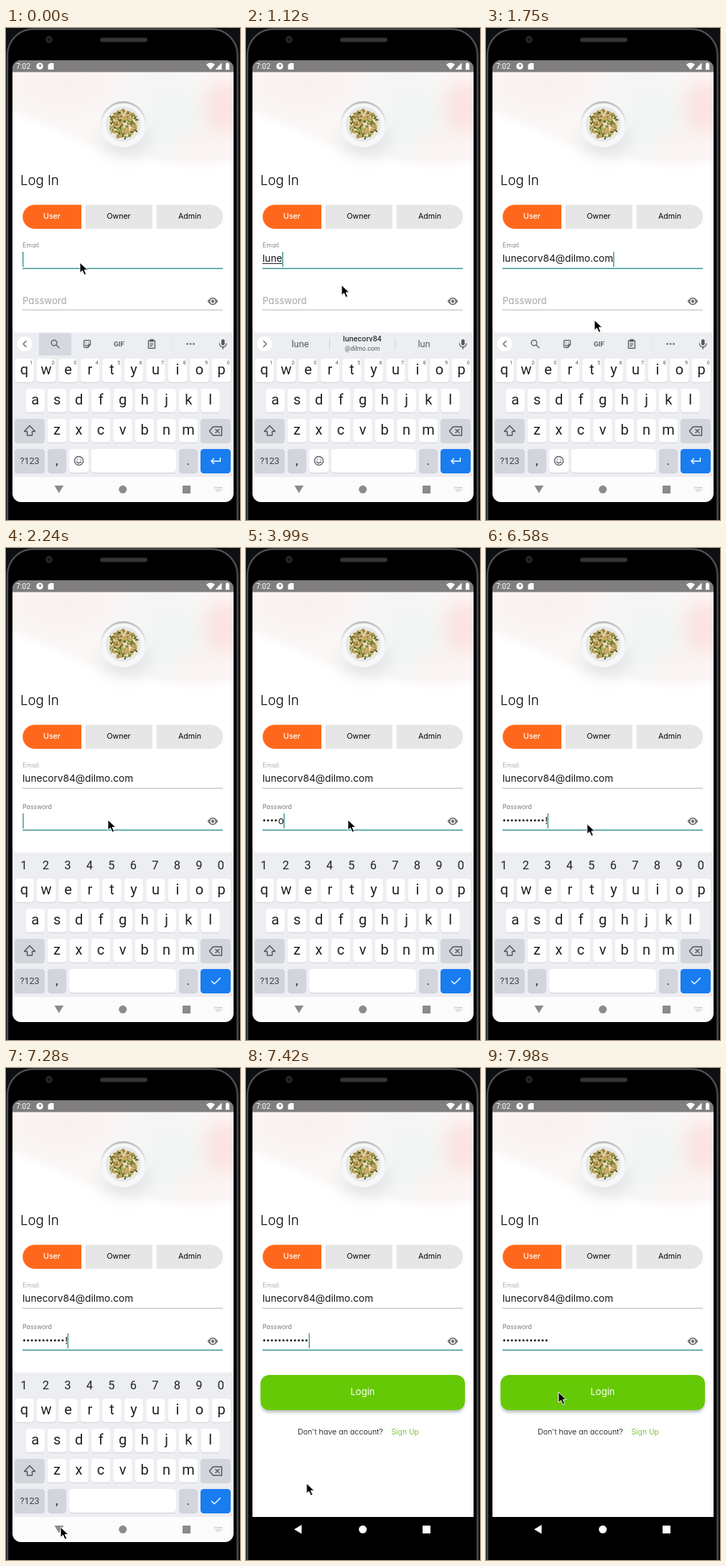
An HTML page for the animation above (8 s loop, 326x686 px).

```html
<!DOCTYPE html>
<html lang="en">
<head>
<meta charset="utf-8">
<title>Log in screen</title>
<style>
html, body { margin: 0; width: 100%; height: 100%; overflow: hidden; background: #000; }
svg { display: block; width: 326px; height: 686px; }
text { font-family: Inter, "Open Sans", sans-serif; font-feature-settings: "cv11"; white-space: pre; }
.sys text, text.sys { font-family: Roboto, "Noto Sans", sans-serif; }
.mid { text-anchor: middle; }
.light { font-weight: 300; }
.soft { filter: blur(12px); }
.line { fill: none; stroke: #5f6368; stroke-width: 1.4; stroke-linecap: round; stroke-linejoin: round; }
.field { font-size: 13.7px; fill: #161616; }

#cursor { animation: cursor 8s linear infinite; }
@keyframes cursor {
  0%, 13.9% { transform: translate(103px, 327px); }
  14% { transform: translate(133px, 358px); }
  16.6% { transform: translate(158px, 432px); }
  17.5%, 20% { transform: translate(161px, 438px); }
  23.6%, 82.1% { transform: translate(142px, 379px); }
  86% { transform: translate(112px, 510px); }
  90%, 91.3% { transform: translate(76px, 640px); }
  91.9% { transform: translate(80px, 607px); }
  95.5% { transform: translate(98px, 490px); }
  98.5%, 100% { transform: translate(101px, 452px); }
}
#hint { animation: hint 8s linear infinite; }
@keyframes hint {
  0%, 24.4% { transform: translate(23px, 385px); fill: #a6a6a6; }
  26.4%, 100% { transform: translate(23px, 364.3px) scale(.665); fill: #777; }
}
</style>
</head>
<body>
<svg viewBox="0 0 326 686">
  <defs>
    <clipPath id="screen"><rect x="9" y="45" width="308" height="616" rx="12"/></clipPath>
    <clipPath id="app"><rect x="9" y="61" width="308" height="565"/></clipPath>
    <clipPath id="food"><circle cx="163.500" cy="134" r="22.500"/></clipPath>
    <linearGradient id="plate" x2="0" y2="1">
      <stop stop-color="#b9bcbf"/><stop offset=".35" stop-color="#e3e5e7"/><stop offset=".75" stop-color="#fafafa"/>
    </linearGradient>
  </defs>

  <!-- phone body -->
  <rect width="326" height="686" fill="#0d0f12"/>
  <rect x="2" y="1.500" width="320.500" height="720" rx="36" fill="#000" stroke="#4c4d4f" stroke-width="2.400"/>
  <rect x="131" y="13.500" width="66" height="6" rx="3" fill="#343434"/>
  <circle cx="60" cy="16" r="5" fill="#25262a"/>
  <circle cx="60" cy="16" r="2.200" fill="#11131a"/>

  <g clip-path="url(#screen)">
    <rect x="9" y="45" width="308" height="581" fill="#fff"/>

    <!-- header -->
    <g clip-path="url(#app)">
      <path d="M0 50H330V186L240 190 130 170 60 138 0 114z" fill="#fbf7f6" style="filter:blur(4px)"/>
      <g class="soft">
        <ellipse cx="80" cy="80" rx="70" ry="28" fill="#f9f1ef"/>
        <ellipse cx="215" cy="84" rx="62" ry="28" fill="#f5f5f5"/>
        <ellipse cx="236" cy="136" rx="48" ry="38" fill="#f0f6f4"/>
        <ellipse cx="308" cy="110" rx="34" ry="36" fill="#fbe3e0"/>
        <ellipse cx="276" cy="160" rx="40" ry="22" fill="#faf3f1"/>
        <ellipse cx="168" cy="156" rx="32" ry="22" fill="#e0e2e6"/>
      </g>
      <circle cx="163.500" cy="134" r="32" fill="url(#plate)"/>
      <circle cx="163.500" cy="135" r="30" fill="#f6f7f7"/>
      <circle cx="163.500" cy="134" r="24.500" fill="#e6e7e7"/>
      <g id="pasta" clip-path="url(#food)"></g>
    </g>

    <!-- form -->
    <text x="20" y="219" font-size="18.600" font-weight="350">Log In</text>
    <path d="M105 246.500H40a16.700 16.700 0 0 0 0 33.500h65z" fill="#ff681c"/>
    <path d="M110.500 246.500H204V280h-93.500zM209.500 246.500h76a16.700 16.700 0 0 1 0 33.500h-76z" fill="#e6e6e6"/>
    <g class="mid" font-size="10.600">
      <text x="64" y="266.300" fill="#fff" font-weight="500">User</text>
      <text x="157" y="266.300">Owner</text>
      <text x="256" y="266.300">Admin</text>
    </g>
    <text id="emailLabel" class="light" x="23" y="306.200" font-size="9">Email</text>
    <text id="email" class="field" x="23" y="326"></text>
    <rect id="compose" x="23" y="328" height="1" fill="#222"/>
    <rect id="emailLine" x="23" width="279"/>
    <text id="hint" font-size="13.200">Password</text>
    <g id="dots" fill="#161616"></g>
    <text id="last" class="field" y="384.500"></text>
    <rect id="passLine" x="23" width="279"/>
    <rect id="caret" width="1.300" height="21" fill="#2c8a87"/>
    <path d="M280.500 381q7.500-10.500 15 0q-7.500 10.500-15 0z" fill="#757575"/>
    <circle cx="288" cy="381" r="2.900" fill="#757575" stroke="#fff" stroke-width="1.300"/>

    <rect x="21" y="432" width="283" height="48" rx="11" fill="#777" opacity=".5" style="filter:blur(2px)"/>
    <rect x="20.300" y="428" width="284.700" height="49" rx="12" fill="#65c905"/>
    <text class="mid" x="162.500" y="455.500" font-size="13" fill="#fff">Login</text>
    <text class="light" x="72" y="511" font-size="10.700">Don't have an account?</text>
    <text x="202.500" y="511" font-size="10.300" fill="#86bf3c">Sign Up</text>

    <!-- keyboard -->
    <g id="keyboard" class="sys">
      <rect x="9" y="424.500" width="308" height="202" fill="#eceef2"/>
      <g id="keys"></g>
      <g id="textMode"></g>
      <g id="passMode"></g>
      <g id="tools">
        <rect id="pressed" x="46" y="425.500" width="45" height="31" fill="#d5d8de"/>
        <circle cx="26" cy="440.500" r="10.500" fill="#fff"/>
        <path class="line" d="M28 436.500l-4 4 4 4"/>
        <circle class="line" cx="67" cy="439" r="3.800"/>
        <path class="line" d="M70 442l4 4"/>
        <path class="line" d="M117.500 441.500v-4.500q0-1.500-1.500-1.500h-6q-1.500 0-1.500 1.500v7q0 1.500 1.500 1.500h4zh-3v4M111.200 439h.1M114.800 439h.1M110.500 442q1 1.500 2.500 1"/>
        <text class="mid" x="157.500" y="444" font-size="9.800" font-weight="700" fill="#5f6368">GIF</text>
        <path class="line" d="M198.500 436h9v10.500h-9zM201 434.500h4v2.500h-4zM200.800 440.500h4.400M200.800 443.300h3"/>
        <rect x="230" y="432" width="1" height="16" fill="#dcdfe3"/>
        <path class="line" d="M252.500 440.500h.1M257 440.500h.1M261.500 440.500h.1" style="stroke-width:2.600"/>
      </g>
      <g id="suggest" class="mid" fill="#55595e">
        <circle cx="26" cy="440.500" r="10.500" fill="#fff"/>
        <path class="line" d="M24.500 436.500l4 4-4 4"/>
        <path d="M116 432h1v17h-1zM207.500 432h1v17h-1z" fill="#cfd2d7"/>
        <text id="sugLeft" x="75.500" y="445" font-size="12.800"></text>
        <text id="sugUser" x="162" y="437" font-size="10.800" font-weight="500" fill="#33373b"></text>
        <text id="sugHost" x="162" y="449.500" font-size="8.600"></text>
        <text id="sugRight" x="248" y="445" font-size="12.800"></text>
      </g>
      <g id="mic">
        <rect x="300" y="434" width="4.600" height="8.500" rx="2.300" fill="#55595e"/>
        <path class="line" d="M297.500 440a4.800 4.800 0 0 0 9.600 0M302.300 445v2.200"/>
      </g>
    </g>

    <!-- navigation bar -->
    <g id="navLight" fill="#8b8b8b">
      <rect x="9" y="626" width="308" height="36" fill="#fcfcfd"/>
      <path d="M67.500 638h12.600l-6.300 10.500z"/>
      <circle cx="162.700" cy="643.300" r="5.500"/>
      <rect x="246" y="638" width="11" height="11" rx=".6"/>
      <path d="M290.500 640.500h11M290.500 643h11M292.500 645.500h7" stroke="#999" stroke-width="1.200" stroke-dasharray="1.300 1"/>
    </g>
    <g id="navDark" fill="#fff">
      <rect x="9" y="626" width="308" height="36" fill="#000"/>
      <path d="M77.500 637v12.600l-10.500-6.300z"/>
      <circle cx="162.700" cy="643.300" r="5.500"/>
      <rect x="246" y="638" width="11" height="11" rx=".6"/>
    </g>

    <!-- status bar -->
    <rect x="9" y="45" width="308" height="16.500" fill="#807e7f"/>
    <g fill="#fff">
      <text class="sys" x="14" y="57" font-size="10.400">7:02</text>
      <circle cx="47" cy="53.300" r="4.800"/>
      <path d="M46 51h3v2.500h-3zv5" fill="#807e7f"/>
      <path d="M61 49h5.500v9h-8v-6.500z"/>
      <path d="M279 51q6-4.800 12 0l-6 7.300zM300.500 48.500v9.500h-9z"/>
      <path d="M306 49.500h1.300v-1.200h2.600v1.200h1.300v8.700H306z"/>
    </g>
  </g>

  <path id="cursor" d="M0 0v14.500l3.400-3.200 2.700 6 2.600-1.200-2.600-5.800h4.700z" fill="#000" stroke="#fff" stroke-width="1"/>
</svg>

<script>
const $ = id => document.getElementById(id);
const LOOP = 8000, PITCH = 30.5;
const user = "lunecorv84", host = "@dilmo.com";
const typedAt = [210, 350, 560, 840];
const rightWords = ["", "let", "lucky", "lunch", "lun"];
const secret = "haunoarm120!";
const secretAt = [2730, 3220, 3430, 3640, 3915, 4690, 4900, 5110, 5450, 5525, 5740, 6090];
const FILL_AT = 1610, PASS_AT = 1960, HIDE_AT = 7340;

// Keyboard parts
const rect = (x, y, w, h, fill) => `<rect x="${x}" y="${y}" width="${w}" height="${h}" rx="4.5" fill="${fill}"/>`;
const key = (x, y, w, fill = "#fff") => rect(x, y + 1, w, 33, "#cdd1d7") + rect(x, y, w, 33, fill);
const label = (x, y, size, s, fill = "#202124") =>
  `<text class="mid" x="${x}" y="${y}" font-size="${size}" fill="${fill}">${s}</text>`;
const row = (letters, x, y) => [...letters].map((c, i) =>
  key(x + i * PITCH - 13.2, y, 26.4) + label(x + i * PITCH, y + 22.3, 20, c)).join("");
const icon = (d, color = "#50555b") => `<path class="line" d="${d}" style="stroke:${color}"/>`;
const GREY = "#d2d6dc", BLUE = "#197df0";

$("keys").innerHTML =
  row("qwertyuiop", 25.5, 461) + row("asdfghjkl", 40.7, 503) + row("zxcvbnm", 71, 545) +
  key(12, 545, 42, GREY) + icon("M33 554.500l-7.500 8h4v5.500h7v-5.500h4z") +
  key(271, 545, 42, GREY) + icon("M283.500 562l5-6h12v12h-12zM292 559.500l5 5M297 559.500l-5 5") +
  key(12, 587, 42, GREY) + label(33, 608, 12.5, "?123", "#3c4043") +
  key(58, 587, 26, GREY) + label(71, 609, 17, ",") +
  key(241, 587, 26, GREY) + label(254, 609, 17, ".") +
  rect(271, 587, 42, 34, BLUE);

const digits = "1234567890";
$("textMode").innerHTML =
  [...digits].map((d, i) => label(35 + i * PITCH, 469, 7.5, d, "#55595e")).join("") +
  key(88, 587, 27) + key(118.5, 587, 118.5) +
  '<circle class="line" cx="101.500" cy="603.500" r="6"/>' +
  icon("M99.300 602h.1M103.700 602h.1M98.500 605q3 3.200 6 0") +
  icon("M298.500 599.500v4.500h-12M289.500 600.500l-3.500 3.500 3.500 3.500", "#fff");
$("passMode").innerHTML =
  [...digits].map((d, i) => label(25 + i * PITCH, 447.5, 16.5, d)).join("") +
  key(88, 587, 149) + icon("M286.500 604l3.800 3.800 8-8", "#fff");

// Plate of pasta: short strands and herbs
let seed = 7;
const rnd = () => (seed = seed * 16807 % 2147483647) / 2147483647;
const tones = ["#c9a958", "#f3e6bd", "#8a6c35", "#6b8a38", "#d8bf7c", "#3f5a24", "#f8f2dc", "#a98747"];
let pasta = '<circle cx="163.5" cy="134" r="19.5" fill="#bfa465"/>';
for (let i = 0; i < 190; i++) {
  const a = rnd() * 6.3, r = 20.5 * Math.sqrt(rnd()), turn = rnd() * 180;
  const x = 163.5 + r * Math.cos(a), y = 134 + r * Math.sin(a);
  pasta += `<ellipse cx="${x}" cy="${y}" rx="2.3" ry="1" fill="${tones[i % tones.length]}" transform="rotate(${turn} ${x} ${y})"/>`;
}
$("pasta").innerHTML = pasta;
$("dots").innerHTML = [...secret].map((_, i) => `<circle cx="${25.4 + i * 5.35}" cy="379.8" r="1.5"/>`).join("");
$("sugUser").textContent = user;
$("sugHost").textContent = host;

const show = (id, on) => $(id).style.display = on ? "" : "none";
const set = (id, attrs) => { for (const k in attrs) $(id).setAttribute(k, attrs[k]); };
const count = (times, t) => times.filter(x => t >= x).length;
const underline = (id, y, on) =>
  set(id, { y, height: on ? 1.5 : 1, fill: on ? "#3b9492" : "#b5b5b5" });

function draw(t) {
  const onPass = t >= PASS_AT, filled = t >= FILL_AT, hidden = t >= HIDE_AT;
  const n = count(typedAt, t), typing = n > 0 && !filled;

  $("email").textContent = filled ? user + host : user.slice(0, n);
  const emailEnd = n ? $("email").getComputedTextLength() : 0;
  show("compose", typing);
  set("compose", { width: emailEnd });
  set("emailLabel", { fill: onPass ? "#999" : "#666" });
  underline("emailLine", 334.6, !onPass);
  underline("passLine", 392.6, onPass);

  show("keyboard", !hidden);
  show("tools", !typing && !onPass);
  show("pressed", n === 0);
  show("suggest", typing);
  show("mic", !onPass);
  show("textMode", !onPass);
  show("passMode", onPass);
  $("sugLeft").textContent = user.slice(0, n);
  $("sugRight").textContent = rightWords[n];

  // The newest character stays readable for a while
  const p = count(secretAt, t);
  const masked = p === 0 || (p === 5 && t >= 4480) || t >= 7420;
  const dots = masked ? p : Math.max(p - 1, 0), lastX = 23.3 + dots * 5.35;
  [...$("dots").children].forEach((dot, i) => dot.style.display = i < dots ? "" : "none");
  $("last").textContent = masked ? "" : secret[p - 1];
  set("last", { x: lastX });
  const passEnd = lastX + (masked ? 0 : $("last").getComputedTextLength() - .5);

  show("caret", t < 7700);
  set("caret", onPass ? { x: passEnd, y: 370 } : { x: 23 + emailEnd, y: 312 });
  show("navLight", !hidden);
  show("navDark", hidden);
}

const start = performance.now();
function tick() {
  draw((performance.now() - start) % LOOP);
  requestAnimationFrame(tick);
}
tick();
</script>
</body>
</html>
```
